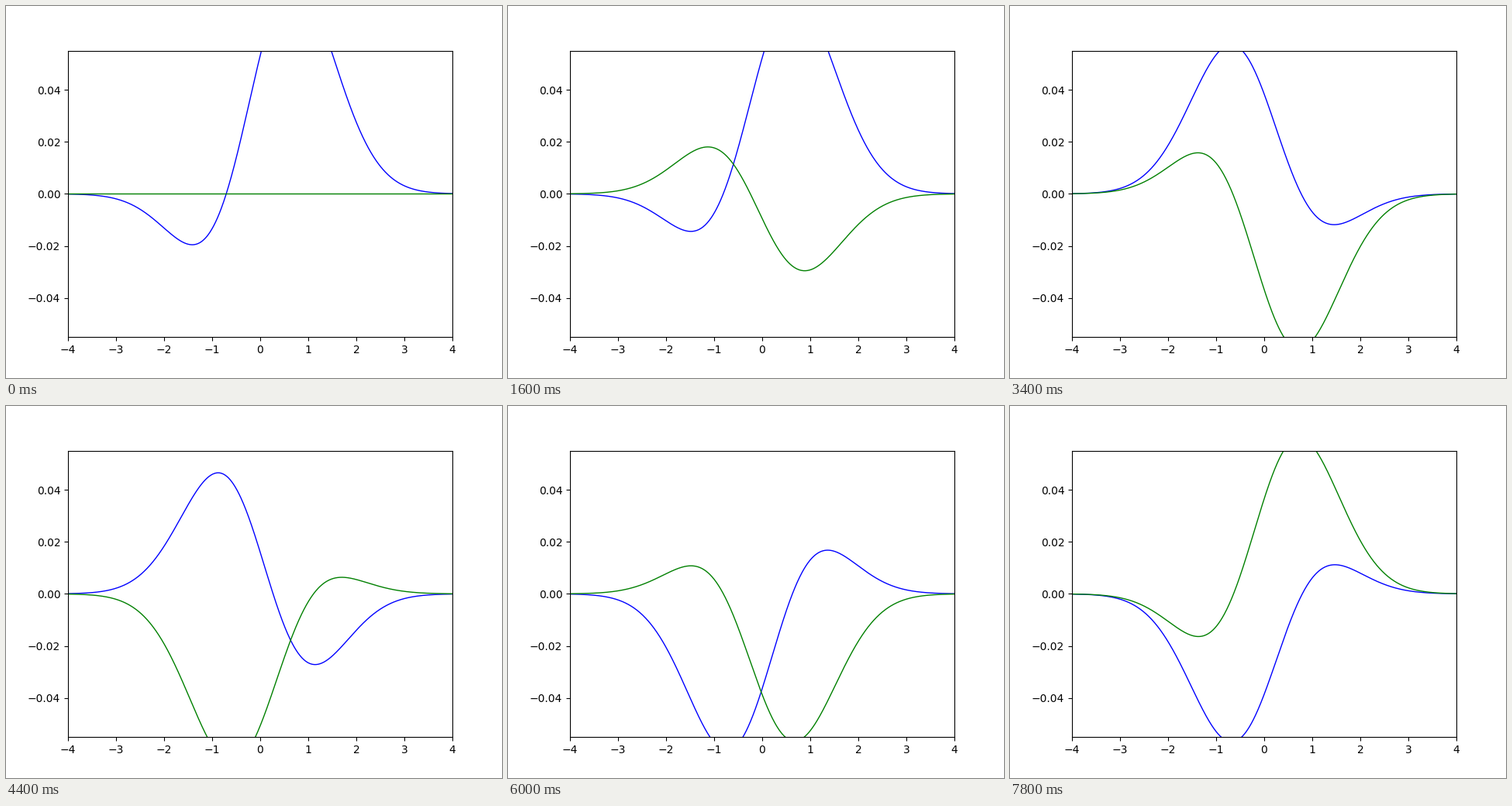
Recreate the animation shown at these times as a matplotlib script. Size 640x480 px, loop 8000 ms.

```python
import numpy as np
import matplotlib.pyplot as plt
from matplotlib.animation import FuncAnimation

FRAMES = 40
INTERVAL = 200   # ms
DT = 0.01
DX = 0.01

# Two lowest oscillator states, each normalised to unit sum on the grid
x = np.linspace(-4, 4, round(8 / DX) + 1)
ground = np.pi ** -0.25 * np.sqrt(DX) * np.exp(-x ** 2 / 2)
excited = np.sqrt(2) * x * ground


def wave(k):
    """Equal mix of both states; the time step grows with every frame."""
    t = DT * k * (k + 1) / 2
    return (ground * np.exp(-0.5j * t) + excited * np.exp(-1.5j * t)) / np.sqrt(2)


fig, ax = plt.subplots(figsize=(6.4, 4.8), dpi=100)
ax.set_xlim(-4, 4)
ax.set_ylim(-0.055, 0.055)
real_line, = ax.plot([], [], color="blue", lw=1)
imag_line, = ax.plot([], [], color="green", lw=1)


def update(k):
    psi = wave(k)
    real_line.set_data(x, psi.real)
    imag_line.set_data(x, psi.imag)
    return real_line, imag_line


anim = FuncAnimation(fig, update, frames=FRAMES, interval=INTERVAL,
                     init_func=lambda: update(0), repeat=True, repeat_delay=0)
plt.show()
```
